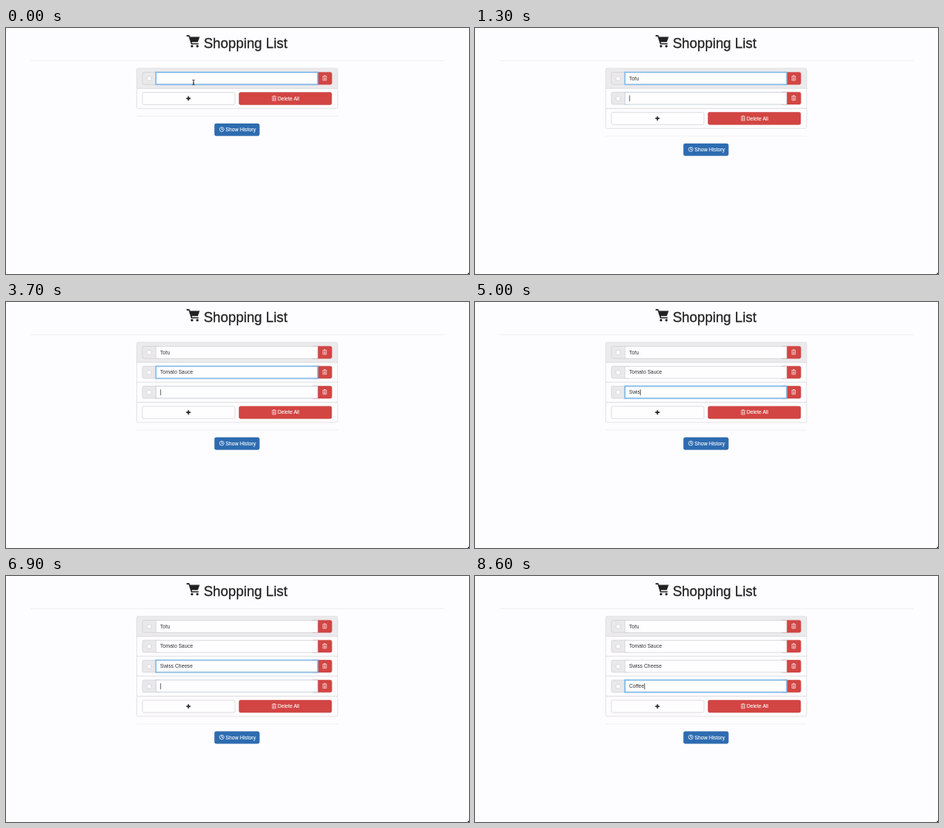
An HTML page that plays this animation: 600x319 px, repeating every 8.7 s.

```html
<!DOCTYPE html>
<html lang="en">
<head>
<meta charset="utf-8">
<title>Shopping List</title>
<style>
  html, body { margin: 0; width: 100%; height: 100%; overflow: hidden; background: #fdfcfe; }
  svg { display: block; width: 600px; height: 319px; }
  text { font: 6.65px "Liberation Sans", Arial, sans-serif; fill: #333; white-space: pre; }
  .title { font-size: 17.9px; fill: #222; stroke: #222; stroke-width: .3; }
  .light { fill: #fff; stroke: #fff; stroke-width: .1; }
  .panel { fill: #fdfcfe; stroke: #dad9dc; stroke-width: .7; }
  .field { fill: #fefdff; stroke: #c9c8cc; stroke-width: .6; }
  .addon { fill: #e9e8eb; stroke: #c9c8cc; stroke-width: .6; }
  .red { fill: #d24543; stroke: #c53b38; stroke-width: .5; }
  .blue { fill: #2d6cb1; stroke: #27609f; stroke-width: .5; }
  .rule { stroke: #eae9ec; stroke-width: .7; }
  .glow { fill: none; stroke: #66afe9; }
</style>
</head>
<body>
<svg viewBox="0 0 600 319">
  <defs>
    <g id="trash" fill="none" stroke="#fff" stroke-width=".65" stroke-opacity=".9">
      <path d="M-2.8-2.3H2.8M-1-2.4V-3.2H1V-2.4M-2.2-1.8V3H2.2V-1.8M-.75-1.2V2.4M.75-1.2V2.4"/>
    </g>
  </defs>

  <g fill="#222">
    <path d="M234 9.3H237.6L238.5 11.6H251L248.6 18.3H240.8L241.2 19.7H249.5V21.2H240L236.7 10.9H234Z"/>
    <circle cx="241" cy="23.6" r="1.6"/><circle cx="248" cy="23.6" r="1.6"/>
  </g>
  <text class="title" x="256.2" y="25.6">Shopping List</text>
  <path class="rule" d="M32 42.5H568"/>

  <g id="footer">
    <rect class="panel" x="169.4" y="78.4" width="260.4" height="26" rx="2"/>
    <rect class="field" x="176.8" y="83.5" width="120" height="16" rx="2"/>
    <path d="M233.6 91.4H239.2M236.4 88.6V94.2" stroke="#222" stroke-width="1.6"/>
    <rect class="red" x="302" y="83.5" width="120" height="16" rx="2"/>
    <use href="#trash" x="347.4" y="91.2"/>
    <text class="light" x="352" y="93.8">Delete All</text>
    <path class="rule" d="M169.5 114.3H430"/>
    <rect class="blue" x="270.3" y="124.1" width="58" height="15.6" rx="2"/>
    <g fill="none" stroke="#fff" stroke-width=".8">
      <circle cx="279.6" cy="131.5" r="2.8"/><path d="M279.6 129.6V131.7H281.1"/>
    </g>
    <text class="light" x="284.6" y="134.2">Show History</text>
  </g>

  <g id="rows"></g>

  <path id="pointer" d="M241.4 67.2Q243 67.2 243 68.4Q243 67.2 244.6 67.2M243 68V73M241.4 73.8Q243 73.8 243 72.6Q243 73.8 244.6 73.8M242 71H244"
        fill="none" stroke="#222" stroke-width=".8"/>
  <path d="M600 317V319H598Z" fill="#222"/>
</svg>

<script>
const LOOP = 8700, STEP = 100, PITCH = 25.85, FADE = 150, BLINK = 500;
const TEXT_X = 199.8;

// Each item: when its row appears and when each of its letters is typed.
const items = [
  { text: 'Tofu', start: 0, keys: [300, 500, 600, 800] },
  { text: 'Tomato Sauce', start: 1300,
    keys: [1700, 1900, 2000, 2200, 2300, 2500, 2600, 2700, 2800, 2900, 3000, 3100] },
  { text: 'Swiss Cheese', start: 3700,
    keys: [4300, 4500, 4800, 5000, 5200, 5400, 5600, 5800, 5900, 6100, 6300, 6500] },
  { text: 'Coffee', start: 6900, keys: [7300, 7500, 7700, 7900, 8100, 8300] },
];

const byId = id => document.getElementById(id);
const show = (node, visible) => node.setAttribute('visibility', visible ? 'inherit' : 'hidden');
const clamp = v => Math.max(0, Math.min(1, v));
const smooth = v => v * v * (3 - 2 * v);

const rowMarkup = (_, i) => `
  <g class="row" transform="translate(0 ${i * PITCH})">
    ${i === 0
      ? '<path class="panel" style="fill:#ebeaec" d="M169.4 78.3V54.2Q169.4 52.2 171.4 52.2H427.8Q429.8 52.2 429.8 54.2V78.3Z"/>'
      : '<rect class="panel" x="169.4" y="52.4" width="260.4" height="25.9"/>'}
    <rect class="addon" x="176.8" y="57.4" width="24" height="15.8" rx="2"/>
    <rect class="field" x="182.9" y="62.9" width="5.3" height="5.3" rx="1"/>
    <rect class="red" x="396" y="57.4" width="26.2" height="15.8" rx="2"/>
    <rect class="field" x="194.2" y="57.4" width="209.8" height="15.8"/>
    <g class="focus">
      <rect class="glow" x="194.2" y="57.4" width="209.8" height="15.8" stroke-width="2.4" opacity=".3"/>
      <rect class="glow" x="194.2" y="57.4" width="209.8" height="15.8" stroke-width=".9"/>
    </g>
    <use href="#trash" x="413" y="65"/>
    <text x="${TEXT_X}" y="67.5"></text>
    <path class="caret" d="M.5 61.6V69.4" stroke="#222" stroke-width=".7"/>
  </g>`;

byId('rows').innerHTML = items.map(rowMarkup).join('');
const rows = [...document.querySelectorAll('.row')].map(node => ({
  node,
  label: node.querySelector('text'),
  focus: node.querySelector('.focus'),
  caret: node.querySelector('.caret'),
}));

// Focus fades in when a row appears and out when the next one takes over.
function focusAt(i, t) {
  const fade = start => smooth(clamp((t - start + 30) / FADE));
  const gained = i ? fade(items[i].start) : 1;
  const next = items[i + 1];
  return gained * (next && t >= next.start ? 1 - fade(next.start) : 1);
}

function draw(t) {
  const current = items.filter(item => t >= item.start).length - 1;
  rows.forEach((row, i) => {
    const { text, start, keys } = items[i];
    show(row.node, i <= current);
    const typed = keys.filter(k => t >= k).length;
    row.label.textContent = text.slice(0, typed);
    row.focus.setAttribute('opacity', focusAt(i, t));

    const lastKey = typed ? keys[typed - 1] : start;
    const lit = Math.floor((t - lastKey) / BLINK) % 2 === 0;
    show(row.caret, i === current && lit && t >= items[0].keys[0]);
    const width = typed ? row.label.getComputedTextLength() : 0;
    row.caret.setAttribute('transform', `translate(${TEXT_X + width} 0)`);
  });
  byId('footer').setAttribute('transform', `translate(0 ${current * PITCH})`);
  show(byId('pointer'), t < items[0].keys[0]);
}

const origin = performance.now();
function tick() {
  const elapsed = (performance.now() - origin) % LOOP;
  draw(Math.floor(elapsed / STEP) * STEP);
  requestAnimationFrame(tick);
}
tick();
</script>
</body>
</html>
```
